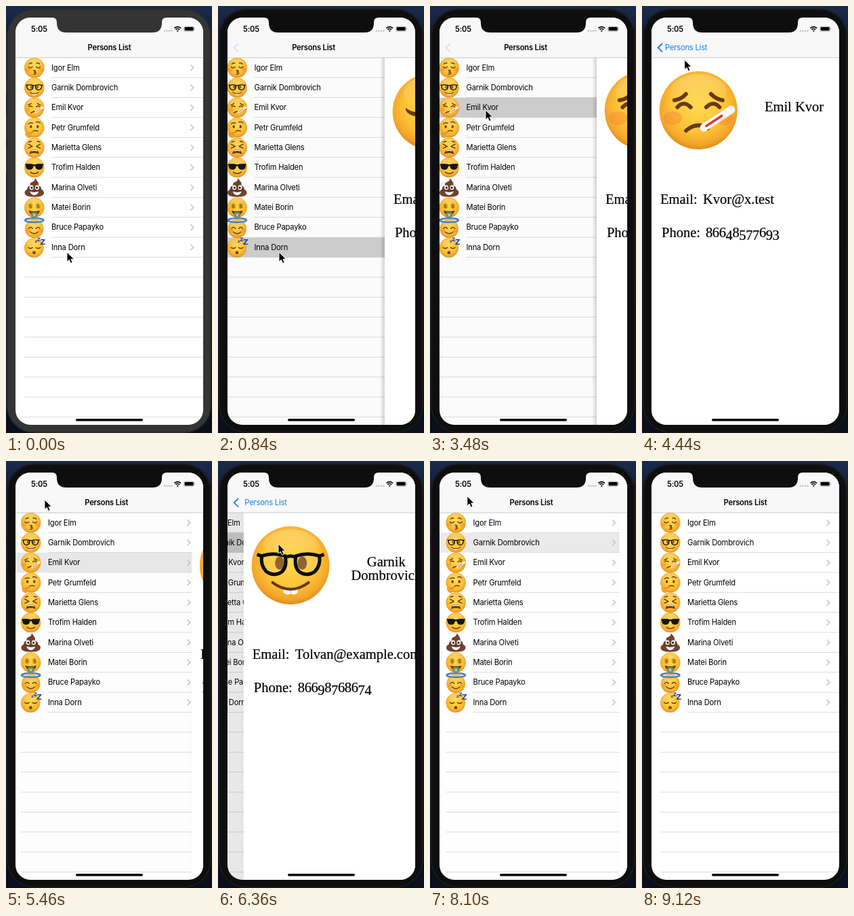
Animation of 304x628 px, one loop 9.18 s. Source, as an HTML page:

```html
<!DOCTYPE html>
<html lang="en">
<head>
<meta charset="utf-8">
<title>Persons List</title>
<style>
  html, body { margin: 0; width: 100%; height: 100%; overflow: hidden; background: #0c1322; }
  svg#stage { display: block; width: 100vw; height: 100vh; }
  text { font: 400 11.2px Inter, "Liberation Sans", sans-serif; letter-spacing: -.2px; }
  .bold { font-weight: 600; }
  .serif text { font: 20.5px "Liberation Serif", serif; letter-spacing: 0; stroke: #000; stroke-width: .2; }
  .serif .figures { letter-spacing: -.4px; }
  .serif .low { font-size: 15px; letter-spacing: 2px; }
  .serif .glyph text { stroke: none; }
  .glyph text { font: 700 20px "DejaVu Sans", sans-serif; letter-spacing: 0; }
  .line { fill: none; stroke: #68391a; stroke-width: 5; stroke-linecap: round; stroke-linejoin: round; }
</style>
</head>
<body>
<svg id="stage" viewBox="0 0 304 628">
  <defs>
    <radialGradient id="skin" cx=".5" cy=".43" r=".58">
      <stop offset="0" stop-color="#ffd94f"/><stop offset=".6" stop-color="#fcc337"/>
      <stop offset=".86" stop-color="#f3a62a"/><stop offset="1" stop-color="#de881a"/>
    </radialGradient>
    <linearGradient id="shine" x2="0" y2="1">
      <stop offset="0" stop-color="#fff" stop-opacity=".22"/><stop offset="1" stop-color="#fff" stop-opacity="0"/>
    </linearGradient>
    <linearGradient id="edge"><stop offset="0" stop-opacity="0"/><stop offset="1" stop-opacity=".2"/></linearGradient>
    <linearGradient id="desk" x2="0" y2="1">
      <stop offset="0" stop-color="#1b2b4c"/><stop offset=".08" stop-color="#121b30"/><stop offset="1" stop-color="#0a0f1b"/>
    </linearGradient>
    <clipPath id="screen"><rect x="14" y="17" width="277" height="599" rx="22"/></clipPath>
  </defs>

  <rect width="304" height="628" fill="url(#desk)"/>
  <g class="bezel">
    <rect x="0" y="107" width="4" height="19"/><rect x="0" y="159" width="4" height="36"/>
    <rect x="0" y="208" width="4" height="36"/>
    <rect x="1" y="4" width="302" height="624" rx="41"/>
  </g>
  <rect x="2" y="5" width="300" height="622" rx="40" fill="none" stroke="#262626" stroke-width="1"/>

  <g clip-path="url(#screen)">
    <rect x="14" y="17" width="277" height="599" fill="#fff"/>
    <g id="list"></g>
    <rect id="dim" x="14" y="76" width="277" height="540"/>
    <g id="detail">
      <rect id="shadow" x="-7" y="76" width="7" height="540" fill="url(#edge)"/>
      <rect y="76" width="290" height="540" fill="#fff"/>
      <g id="cards" class="serif"></g>
    </g>
    <rect x="14" y="17" width="277" height="59" fill="#f8f8f8"/>
    <rect x="14" y="75.7" width="277" height=".7" fill="#b2b2b2"/>
    <text id="title" class="bold" x="152.5" y="65.4" text-anchor="middle">Persons List</text>
    <path id="back" d="M30 55l-6.3 6.3 6.3 6.3" fill="none" stroke="#1a7ce8" stroke-width="2"/>
    <text id="label" y="65.4">Persons List</text>
    <text class="bold" x="37" y="37.6">5:05</text>
    <g fill="#b9b9b9">
      <circle cx="234" cy="36.6" r="1.2"/><circle cx="237.5" cy="36.6" r="1.2"/>
      <circle cx="241" cy="36.6" r="1.2"/><circle cx="244.5" cy="36.6" r="1.2"/>
    </g>
    <g fill="none" stroke="#000" stroke-width="1.6">
      <path d="M248.5 32.6q4.8-4 9.6 0M250.3 34.7q3-2.4 6 0"/><path d="M252.2 36.6h2.2"/>
    </g>
    <rect x="262.6" y="30.1" width="15" height="7.2" rx="2" fill="none" stroke="#999" stroke-width=".7"/>
    <rect x="263.6" y="31.1" width="13" height="5.2" rx="1.2"/><path d="M278.4 32.4q1.5 1.3 0 2.6z" fill="#777"/>
  </g>
  <path class="bezel" d="M68 16v1q7 0 7 7v1q0 14 14 14h127q14 0 14-14v-1q0-7 7-7v-1z"/>
  <rect x="103" y="607" width="99" height="3.4" rx="1.7"/>
  <path id="cursor" d="M0 0v14.2l3.3-3 2.2 5.2 2.6-1.1-2.2-5.1h4.4z" fill="#000" stroke="#fff" stroke-width=".9"/>
</svg>
<script>
const LOOP = 9180, STEP = 60, ROW = 29.37, TOP = 76, WIDTH = 277;
const $ = id => document.getElementById(id);
const clamp = v => Math.max(0, Math.min(1, v));

const line = (d, extra = '') => `<path class="line" d="${d}" ${extra}/>`;
const shape = (d, fill) => `<path d="${d}" fill="${fill}"/>`;
const oval = (x, y, rx, ry, fill) => `<ellipse cx="${x}" cy="${y}" rx="${rx}" ry="${ry}" fill="${fill}"/>`;
const glyph = (s, x, y, size, fill) =>
  `<text x="${x}" y="${y}" text-anchor="middle" fill="${fill}" style="font-size:${size}px">${s}</text>`;
const brown = '#68391a';
const head = oval(50, 50, 50, 50, 'url(#skin)') + oval(50, 25, 36, 21, 'url(#shine)');
const eyes = (y = 44) => oval(33, y, 5.5, 7.5, brown) + oval(67, y, 5.5, 7.5, brown);
const blush = oval(17, 60, 12, 9, '#f47d3566') + oval(83, 60, 12, 9, '#f47d3566');

const faces = {
  kiss: head + blush + line('M20 46q10 10 21 0M59 46q11 10 21 0M24 31q7-6 14-4M62 27q8-2 14 4')
    + line('M46 63q14 0 8 7q-3 2-5 2q13 1 7 8q-3 3-9 2'),
  nerd: head
    + oval(36, 47, 6, 8.5, '#85531b') + oval(65, 47, 6, 8.5, '#85531b')
    + `<g fill="#ffffff18" stroke="#0d0d0d" stroke-width="4.4">
        <path d="M13 38q15-5 30 0q3 13-4 20q-10 7-20 0q-8-8-6-20zM57 38q15-5 30 0q2 12-6 20q-10 7-20 0q-7-7-4-20z"/>
        <path d="M7 36l8 3M93 36l-8 3M43 40q7-4 14 0" fill="none"/></g>`
    + shape('M41 80h18v5q-4 4-9 1q-5 3-9-1z', '#fff') + line('M50 80v6', 'style="stroke:#ccc;stroke-width:1"')
    + line('M27 72q23 17 46 0', 'style="stroke-width:3.6"'),
  fever: head + blush + line('M23 46q8-9 17 0M60 46q9-9 17 0M19 37q9-1 15-8M66 29q7 7 15 8')
    + line('M34 76q14-12 28-3')
    + line('M57 72L92 49', 'style="stroke:#f5f8fb;stroke-width:10"')
    + line('M60 70L80 57', 'style="stroke:#d93636;stroke-width:3"'),
  think: head + eyes(45) + line('M21 31q10-8 21-3M59 23q11-5 20 4M43 68q11-6 24-1')
    + shape('M4 78q8-10 16-4l26-7q8 0 4 7l-17 8q10 10-4 19q-22 4-25-23z', '#f2a32b')
    + line('M23 80l24-9', 'style="stroke:#cd7a17;stroke-width:2"'),
  tired: head + line('M20 33l20 11-20 9M80 33L60 44l20 9M22 22l13-3M78 22l-13-3')
    + shape('M26 82q2-23 24-23t24 23q-24-9-48 0z', brown) + shape('M34 65q16-8 32 0l-2 4q-14-5-28 0z', '#fff'),
  cool: head + shape('M3 33q23-5 47 2q24-7 47-2l-4 8q-2 20-20 20q-16 0-19-18h-8q-3 18-19 18q-18 0-20-20z', '#151515')
    + line('M31 73q19 15 39 0'),
  pile: shape('M53 4q2 13-13 18q-16 6-9 19q-18 3-16 18q-15 5-13 20q3 18 48 18t48-18q2-15-13-20q2-15-16-18q6-10-1-19q-4-4-6-8q-3-8-9-10z', '#70442f')
    + line('M31 42q22 8 38-2M17 61q34 11 66-1', 'style="stroke:#502d20;stroke-width:3"')
    + oval(36, 50, 10, 12, '#fff') + oval(64, 50, 10, 12, '#fff') + oval(37, 51, 5, 6, '#111') + oval(63, 51, 5, 6, '#111')
    + shape('M28 70q22 7 44 0q-6 18-22 18t-22-18z', '#fff'),
  money: head + oval(31, 42, 15, 16, '#f1b52c') + oval(69, 42, 15, 16, '#f1b52c')
    + glyph('$', 31, 52, 27, '#7d6418') + glyph('$', 69, 52, 27, '#7d6418')
    + shape('M22 65q28 9 56 0q-5 23-28 23t-28-23z', brown) + shape('M36 73h28l3 25H33z', '#6b9370')
    + oval(50, 87, 6, 7, '#b7d2b1'),
  halo: `<g transform="translate(3 9) scale(.94)">${head + blush + line('M20 49q11-13 21 0M59 49q10-13 21 0M29 67q21 18 42 0')}</g>
    <ellipse cx="50" cy="14" rx="46" ry="10" fill="none" stroke="#2560a8" stroke-width="8"/>
    <ellipse cx="50" cy="14" rx="46" ry="10" fill="none" stroke="#7fbcf0" stroke-width="2.5"/>`,
  sleep: `<g transform="translate(0 3) scale(.97)">${head}</g>`
    + shape('M17 47q13 10 27 0q1 3-2 6q-11 9-23 0q-3-3-2-6zM55 47q13 10 27 0q1 3-2 6q-11 9-23 0q-3-3-2-6z', brown)
    + oval(49, 76, 8, 8, brown) + oval(49, 78, 5, 4, '#8b4a22')
    + glyph('z', 58, 26, 20, '#27478f') + glyph('Z', 73, 19, 25, '#27478f') + glyph('Z', 92, 35, 37, '#27478f')
};
const emoji = (kind, x, y, size) =>
  `<g class="glyph" transform="translate(${x} ${y}) scale(${size / 100})">${faces[kind]}</g>`;

const people = [
  ['Igor Elm', 'kiss'], ['Garnik Dombrovich', 'nerd'], ['Emil Kvor', 'fever'], ['Petr Grumfeld', 'think'],
  ['Marietta Glens', 'tired'], ['Trofim Halden', 'cool'], ['Marina Olveti', 'pile'], ['Matei Borin', 'money'],
  ['Bruce Papayko', 'halo'], ['Inna Dorn', 'sleep']
];
const visits = [
  { row: 9, push: 780, pop: 2490, name: ['Inna Dorn'], email: 'Dor@v.test', phone: '86904448577' },
  { row: 2, push: 3420, pop: 5085, name: ['Emil Kvor'], email: 'Kvor@x.test', phone: '86648577693' },
  { row: 1, push: 6020, pop: 7687, name: ['Garnik', 'Dombrovich'], email: 'Tolvan@example.com', phone: '86698768674' }
];

// Text figures: 0-2 at x-height, some digits hanging below the baseline.
function figures(number) {
  let shift = 0;
  return [...number].map(d => {
    const want = '34579'.includes(d) ? 4.2 : 0, dy = want - shift;
    shift = want;
    return `<tspan dy="${dy}"${'012'.includes(d) ? ' class="low"' : ''}>${d}</tspan>`;
  }).join('');
}

const rule = (x, i) => `<rect x="${x}" y="${TOP + ROW * i - .6}" width="${291 - x}" height=".8" fill="#d4d4d6"/>`;
let rows = '';
for (let i = 1; i <= 18; i++) rows += rule(i <= people.length ? 67 : 27, i);
rows += `<rect id="mark" x="14" width="${WIDTH}" height="${ROW}" fill="#cfcfcf"/>`;
people.forEach(([name, kind], i) => {
  const y = TOP + ROW * i;
  rows += emoji(kind, 27, y, 29.5) + `<text x="67" y="${y + 18.5}">${name}</text>`
    + `<path d="M272.5 ${y + 10.4}l4.3 4.3-4.3 4.3" fill="none" stroke="#c2c2c6" stroke-width="1.4"/>`;
});
$('list').innerHTML = rows;

$('cards').innerHTML = visits.map(v => `<g>
  ${emoji(people[v.row][1], 11.8, 96, 115)}
  ${v.name.map((s, i) => `<text x="210.5" y="${155 + 20 * i}" text-anchor="middle">${s}</text>`).join('')}
  <text x="13" y="290.5">Email:</text><text x="76" y="290.5">${v.email}</text>
  <text x="15" y="339.5">Phone:</text><text class="figures" x="80" y="339.5">${figures(v.phone)}</text></g>`).join('');
const cards = [...$('cards').children], bezels = document.querySelectorAll('.bezel');

// Critically damped spring from 0 to 1.
function spring(ms) {
  if (ms <= 0) return 0;
  const w = ms * .012, p = 1 - (1 + w) * Math.exp(-w);
  return p > .997 ? 1 : p;
}

// time, x, y of the pointer tip
const path = [
  [0, 90, 362], [1020, 90, 362], [2040, 47, 59], [2640, 47, 59], [3240, 82, 153], [3780, 82, 153],
  [4740, 57, 57], [5480, 57, 57], [5940, 89, 122], [6480, 89, 122], [7320, 53, 59], [7980, 53, 59], [8640, 75, -24], [LOOP, 75, -24]
];
function pointer(t) {
  const i = path.findIndex(k => k[0] > t), [t0, x0, y0] = path[i - 1], [t1, x1, y1] = path[i];
  const u = (t - t0) / (t1 - t0), e = u * u * (3 - 2 * u);
  return [x0 + (x1 - x0) * e, y0 + (y1 - y0) * e];
}

function draw(t) {
  let current = 0;
  visits.forEach((v, i) => { if (t >= v.push - 60) current = i; });
  const v = visits[current], popping = t >= v.pop;
  const p = popping ? 1 - spring(t - v.pop) : spring(t - v.push);

  cards.forEach((c, i) => c.setAttribute('display', i === current ? 'inline' : 'none'));
  $('list').setAttribute('transform', `translate(${-83 * p} 0)`);
  $('detail').setAttribute('transform', `translate(${291 - WIDTH * p} 0)`);
  $('detail').setAttribute('display', p > 0 ? 'inline' : 'none');
  $('shadow').setAttribute('opacity', popping ? p : 1 - p);
  $('dim').setAttribute('opacity', .1 * p);
  $('mark').setAttribute('y', TOP + ROW * v.row);
  $('mark').setAttribute('opacity', t < v.push - 60 ? 0 : popping ? clamp(1 - (t - v.pop) / 700) : 1);

  $('title').setAttribute('transform', `translate(${-70 * p} 0)`);
  $('title').setAttribute('opacity', clamp(1.3 - 1.6 * p));
  $('label').setAttribute('x', 34 + 62 * (1 - p));
  $('label').setAttribute('fill', popping ? '#7b8288' : '#1a7ce8');
  $('label').setAttribute('opacity', clamp((p - .4) / .45) * (popping ? .35 : 1));
  $('back').setAttribute('opacity', p * (popping ? .45 : 1));

  bezels.forEach(b => b.setAttribute('fill', t < 480 ? '#343434' : '#0e0e0e'));
  $('cursor').setAttribute('transform', `translate(${pointer(t)})`);
}

const start = performance.now();
function tick() {
  const t = Math.max(0, performance.now() - start) % LOOP;
  draw(Math.floor(t / STEP) * STEP);
  requestAnimationFrame(tick);
}
tick();
</script>
</body>
</html>
```
